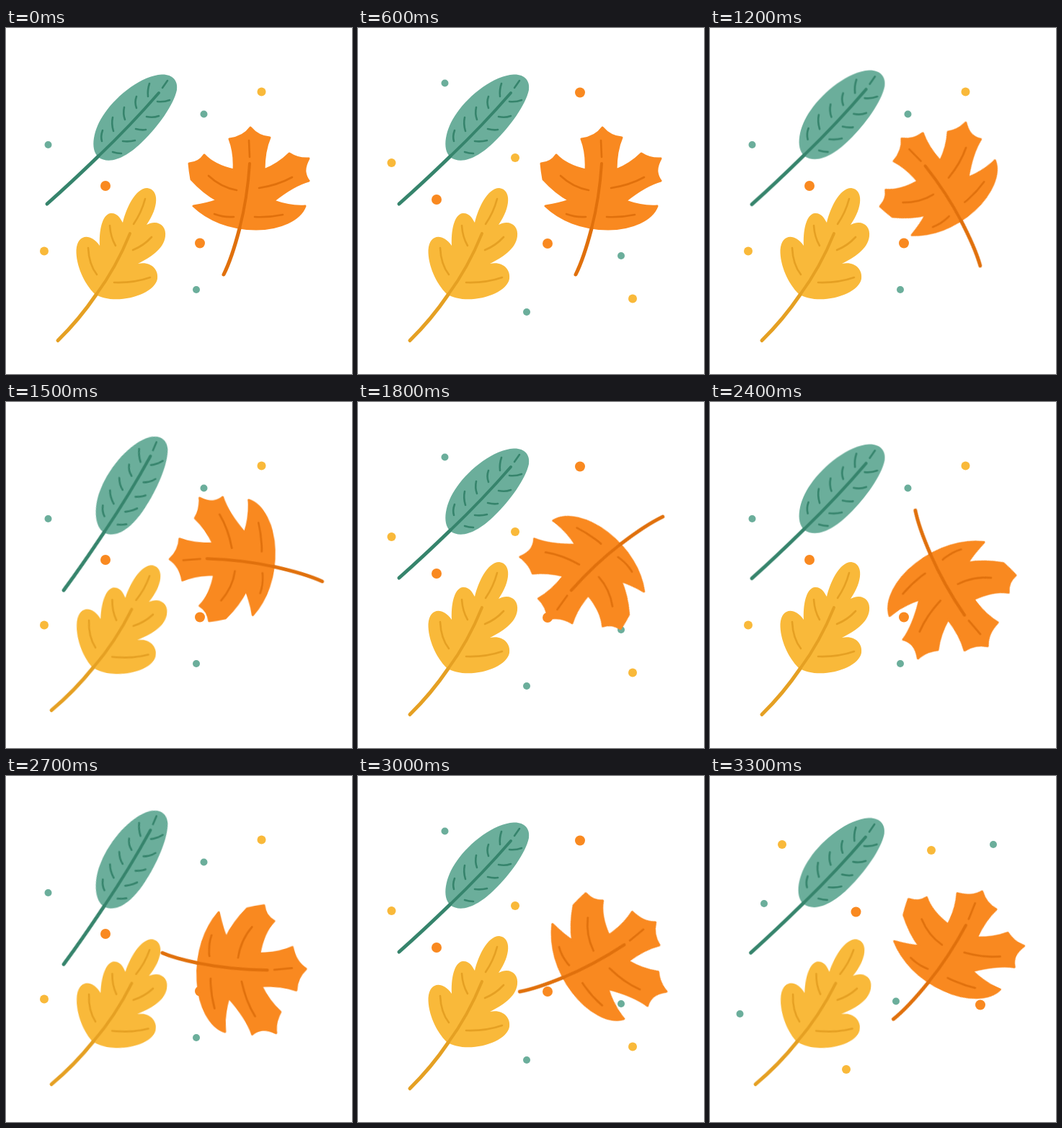
An HTML page for the animation above (3600 ms loop, 480 by 480 pixels).

```html
<!DOCTYPE html>
<html lang="en">
<head>
<meta charset="utf-8">
<title>Autumn leaves</title>
<style>
  html, body { margin: 0; width: 100%; height: 100%; overflow: hidden; background: #fff; }
  svg { display: block; width: 100%; height: 100%; }

  .vein { fill: none; stroke-linecap: round; stroke-width: 2.6; }
  .rib { stroke-width: 4; }
  .stem { stroke-width: 5; vector-effect: non-scaling-stroke; }

  .teal { fill: #6bae9b; }
  .yellow { fill: #f9b93a; }
  .orange { fill: #f98920; }
  .long .vein { stroke: #36846c; }
  .oak .vein { stroke: #e5a023; }
  .maple .vein { stroke: #e0700c; }
  .maple .blade { stroke: #f98920; stroke-width: 3; stroke-linejoin: round; }

  .long { transform-origin: 144px 157px; animation: long 3.6s step-end infinite; }
  .oak { transform-origin: 136px 328px; animation: oak .6s step-end infinite; }
  .maple { transform-origin: 320px 240px; animation: maple 3.6s step-end infinite; }
  .maple .stem { transform-origin: 324px 278px; animation: shorten 3.6s step-end infinite; }
  .dots { visibility: hidden; animation: 1.2s step-end infinite; }
  .dots.a { animation-name: dotsA; }
  .dots.b { animation-name: dotsB; }
  .dots.c { animation-name: dotsC; }

  @keyframes dotsA { 0% { visibility: visible } 50%, 100% { visibility: hidden } }
  @keyframes dotsB { 0%, 75%, 100% { visibility: hidden } 50% { visibility: visible } }
  @keyframes dotsC { 0%, 100% { visibility: hidden } 75% { visibility: visible } }

  @keyframes oak { 0%, 100% { transform: none } 50% { transform: translate(-.8px, -.5px) rotate(4.5deg) } }

  @keyframes long {
    0%, 16.66%, 50%, 83.33%, 100% { transform: none }
    8.33%, 25%, 58.33% { transform: translate(.5px, 0) rotate(-5.8deg) }
    33.33%, 66.66% { transform: translate(3px, -2.5px) rotate(-.4deg) scale(1.03) }
    41.66%, 75% { transform: translate(3.5px, -.8px) rotate(-12.3deg) scale(1.015) }
    91.66% { transform: translate(2px, -2.5px) rotate(-.4deg) scale(1.035) }
  }

  @keyframes maple {
    0%, 16.66%, 100% { transform: none }
    8.33%, 25% { transform: rotate(-12deg) }
    33.33% { transform: translate(0, 2px) rotate(-42deg) }
    41.66% { transform: translate(13px, -6px) rotate(-92deg) scale(1.03) }
    50% { transform: translate(23.5px, -9.5px) rotate(-142deg) scale(1.03) }
    58.33% { transform: translate(28px, -14px) rotate(-163deg) scale(1.07) }
    66.66% { transform: translate(14px, 0) rotate(-218deg) scale(1.07) }
    75% { transform: translate(-14px, 13px) rotate(-273deg) scale(1.07) }
    83.33% { transform: translate(-6px, 12px) rotate(-307deg) scale(1.06) }
    91.66% { transform: translate(-4.5px, 8.5px) rotate(-335.5deg) scale(1.04) }
  }

  @keyframes shorten {
    0%, 91.66%, 100% { transform: none }
    66.66%, 83.33% { transform: scale(.88) }
    75% { transform: scale(.7) }
  }
</style>
</head>
<body>
<svg viewBox="0 0 480 480">
  <g class="dots a">
    <g class="teal"><circle cx="58.5" cy="162" r="5"/><circle cx="274.5" cy="119.5" r="5"/><circle cx="264" cy="363" r="5"/></g>
    <g class="yellow"><circle cx="53" cy="309.5" r="6"/><circle cx="354.5" cy="88.5" r="6"/></g>
    <g class="orange"><circle cx="138" cy="219" r="7"/><circle cx="269" cy="298.5" r="7"/></g>
  </g>
  <g class="dots b">
    <g class="teal"><circle cx="120.5" cy="76.5" r="5"/><circle cx="365" cy="316" r="5"/><circle cx="234" cy="394" r="5"/></g>
    <g class="yellow"><circle cx="46.5" cy="187" r="6"/><circle cx="218" cy="180" r="6"/><circle cx="381" cy="375.5" r="6"/></g>
    <g class="orange"><circle cx="308" cy="89.5" r="7"/><circle cx="109" cy="238" r="7"/><circle cx="263" cy="299" r="7"/></g>
  </g>
  <g class="dots c">
    <g class="teal"><circle cx="75" cy="177" r="5"/><circle cx="393" cy="95" r="5"/><circle cx="258" cy="312.5" r="5"/><circle cx="41.5" cy="330" r="5"/></g>
    <g class="yellow"><circle cx="100" cy="95" r="6"/><circle cx="307" cy="103" r="6"/><circle cx="189" cy="407" r="6"/></g>
    <g class="orange"><circle cx="202.5" cy="188.5" r="7"/><circle cx="375" cy="317.5" r="7"/></g>
  </g>

  <g class="long">
    <path class="teal" d="M128 179C116 168 121 140 137 118C155 92 189 66 216 64.500C231 64 239 73 237 86C233 106 211 137 189 158C171 176 145 192 128 179Z"/>
    <path class="vein stem" d="M57 244Q92 213 128 178"/>
    <path class="vein rib" d="M128 178Q173 135 212 90"/>
    <path class="vein" d="M217 83L224 73M133 157Q131 150 134 142M149 143Q146 133 148 124M165 127Q162 119 164 110M181 111Q178 103 181 95M197 95Q196 86 199 77
      M148 172Q154 174 160 174M162 157Q171 158 179 156M180 140Q188 142 194 141M195 123Q204 125 212 122M210 102Q219 103 227 100"/>
  </g>

  <g class="oak">
    <path class="yellow" d="M123 369C108 354 97 329 97.500 308C99 286 117 284 130 302C129 282 133 259 145 257C154 256 158 263 162 270C166 252 179 222 196 222C213 224 212 249 195 273C210 265 223 274 221 289C219 307 199 319 183 327C200 323 212 334 210 348C206 371 150 386 123 369Z"/>
    <path class="vein stem" d="M72 433.500Q102 404 125 370"/>
    <path class="vein rib" d="M125 370Q153 332 172 285"/>
    <path class="vein" d="M114 305Q115 328 126 342M144 274Q145 290 152 302M193 237Q188 256 177 272M202 290Q191 302 176 308M200 346Q177 354 150 353"/>
  </g>

  <g class="maple">
    <path class="orange blade" d="M260 247C273 245 283 243 293 239C280 232 268 222 257 210Q255 199 254 188Q268 187 275 176C285 187 299 193 316 197C317 180 315 167 310 154Q330 151 339 138Q350 151 366 152C360 166 358 180 358 197C370 192 383 184 393 174Q405 182 420 181Q414 192 415 200Q416 207 420 212C402 217 386 228 371 240C385 245 400 248 415 247C408 266 380 279 347 279C310 279 280 266 260 247Z"/>
    <path class="vein stem" d="M302 342C309 328 317 305 324 278"/>
    <path class="vein rib" d="M324 278C331 251 336 219 338 188"/>
    <path class="vein" d="M338 179L337 156M281 205Q298 221 320 225M289 258Q302 263 316 262M351 222Q377 218 397 207M345 262Q365 263 384 259"/>
  </g>
</svg>
</body>
</html>
```
